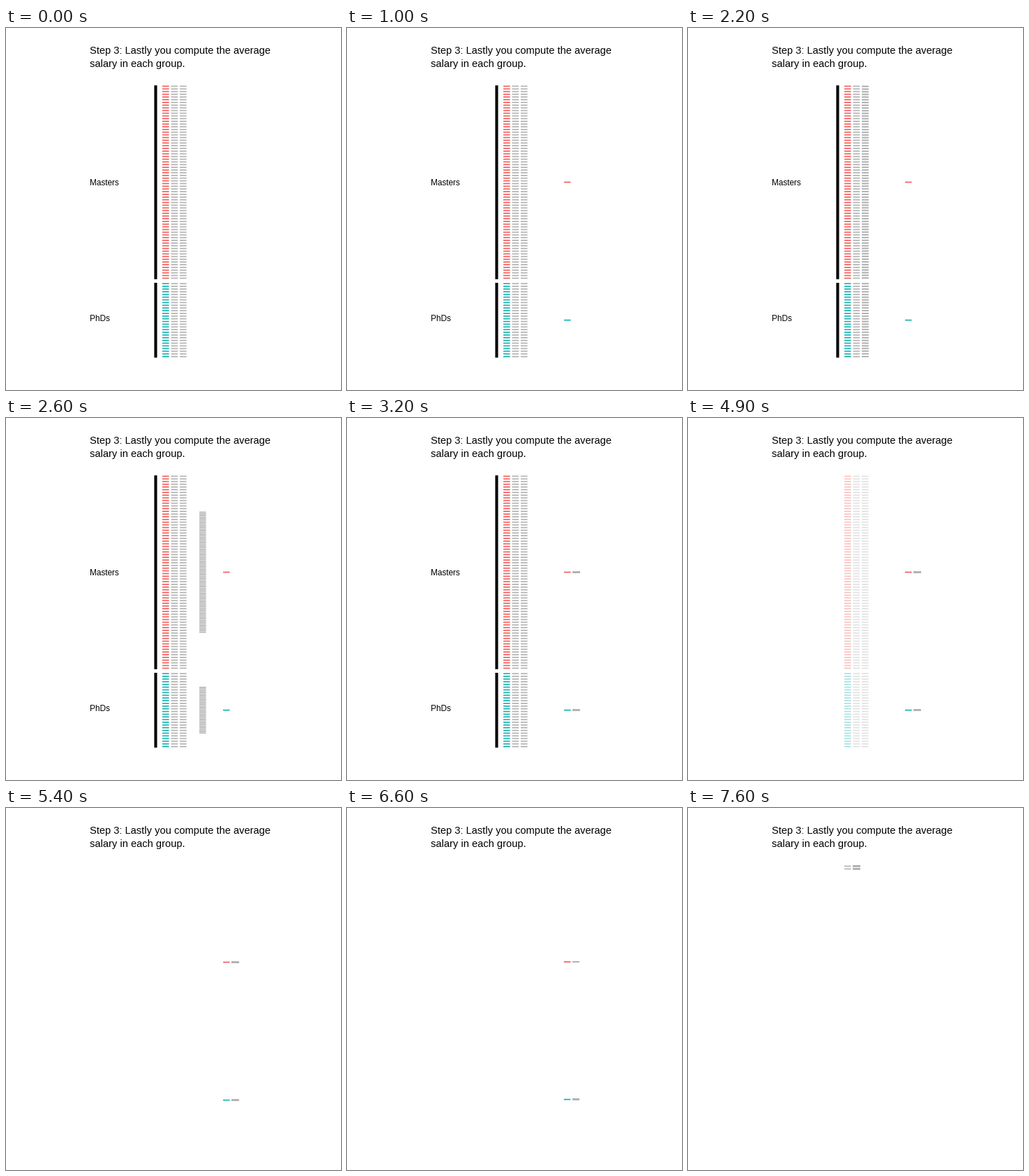
A matplotlib script for the animation above (8 s loop, 480x520 px).

```python
import numpy as np
import matplotlib.pyplot as plt
from matplotlib.animation import FuncAnimation
from matplotlib.collections import LineCollection
from matplotlib.colors import to_rgb
from matplotlib.patches import Rectangle

W, H, DPI = 480, 520, 100
FRAMES, INTERVAL, STEPS = 80, 100, 11
RED, TEAL, GREY = "#f0605c", "#1ab2b2", "#b3b3b3"
PX = 72 / DPI  # points per pixel

BAR, LINE = 9.6, 1.7
COLS = [224, 236.5, 249]
MARK_X, MEAN_X = 311, 323.5
TOP, PITCH = 83.6, 3.885
ROWS = TOP + PITCH * np.r_[0:72, 73:101]
MASTERS, PHDS = ROWS[:72], ROWS[72:]
MEANS = np.array([MASTERS.mean(), PHDS.mean()])
ROW_MEANS = np.repeat(MEANS, [72, 28])
FINAL = ROWS[:2]
ROW_FINAL = np.repeat(FINAL, [72, 28])

fig = plt.figure(figsize=(W / DPI, H / DPI), dpi=DPI, facecolor="white")
ax = fig.add_axes([0, 0, 1, 1])
ax.set_xlim(0, W)
ax.set_ylim(H, 0)
ax.axis("off")


def dashes(x, ys):
    return [[(x, y), (x + BAR, y)] for y in ys]


def add_dashes(x, ys, colors):
    lines = LineCollection(dashes(x, ys), colors=colors, linewidths=LINE * PX,
                           capstyle="butt", snap=False)
    ax.add_collection(lines)
    return lines


def add_text(x, y, text, size):
    return ax.text(x, y, text, fontsize=size * PX, family="Liberation Sans",
                   color="black", va="baseline")


def ease(t):
    """Cubic ease in and out."""
    t = min(max(t, 0), 1)
    return 4 * t**3 if t < 0.5 else 1 - 4 * (1 - t)**3


def progress(frame, start):
    return ease((frame - start + 1) / STEPS)


def mix(a, b, t):
    return a + (b - a) * t


add_text(120, 37, "Step 3: Lastly you compute the average", 14.67)
add_text(120, 56, "salary in each group.", 14.67)

labels = [add_text(120, 226.3, "Masters", 11.8),
          add_text(120, 421.3, "PhDs", 11.8)]
for rows in (MASTERS, PHDS):
    y0, y1 = rows[0] - 1.2, rows[-1] + 1.4
    labels.append(ax.add_patch(Rectangle((212.4, y0), 4.1, y1 - y0,
                                         color="black", lw=0, snap=False)))

table = [add_dashes(COLS[0], ROWS, [RED] * 72 + [TEAL] * 28),
         add_dashes(COLS[1], ROWS, GREY),
         add_dashes(COLS[2], ROWS, GREY)]
marks = add_dashes(MARK_X, MEANS, [RED, TEAL])
salaries = add_dashes(COLS[2], ROWS, GREY)
MARK_RGB = np.array([to_rgb(RED), to_rgb(TEAL)])
GREY_RGB = np.array(to_rgb(GREY))


def draw(frame):
    appear = progress(frame, 0)
    gather = progress(frame, 22)
    fade = progress(frame, 44)
    rise = progress(frame, 66)

    for item in labels:
        item.set_visible(frame < 44)
    for column in table:
        column.set_alpha(1 - fade)

    marks.set_segments(dashes(mix(MARK_X, COLS[0], rise),
                              mix(MEANS, FINAL, rise)))
    marks.set_color(mix(MARK_RGB, GREY_RGB, rise))
    marks.set_alpha(appear)

    # The salaries collapse into the group means, then rise to the top rows.
    x = mix(mix(COLS[2], MEAN_X, gather), COLS[1], rise)
    ys = mix(mix(ROWS, ROW_MEANS, gather), ROW_FINAL, rise)
    salaries.set_segments(dashes(x, ys))
    salaries.set_visible(frame >= 22)
    return [*labels, *table, marks, salaries]


anim = FuncAnimation(fig, draw, frames=FRAMES, interval=INTERVAL,
                     repeat=True, repeat_delay=0, blit=False)
plt.show()
```
